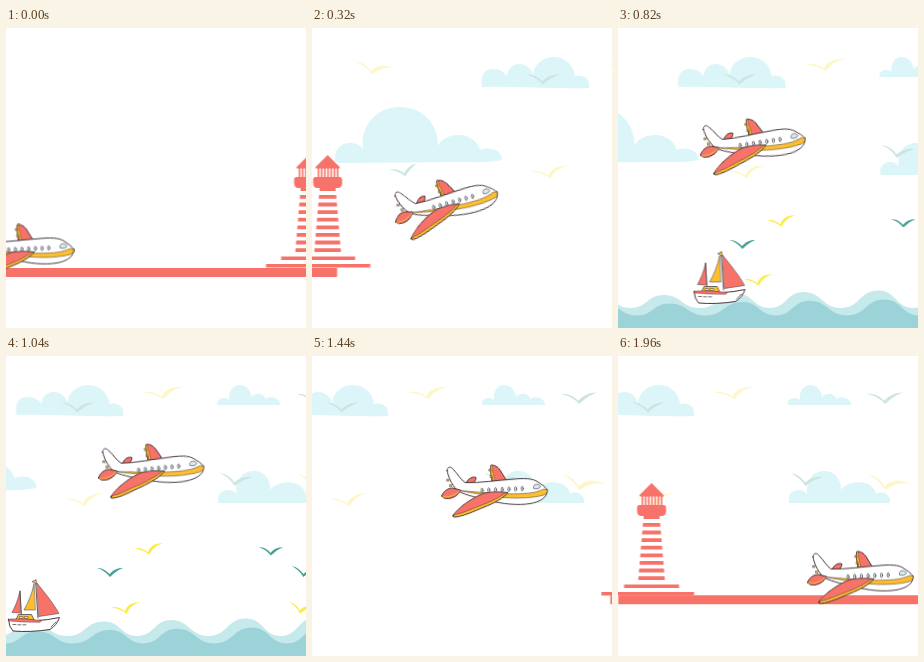
An HTML page for the animation above (1980 ms loop, 300 by 300 pixels).

```html
<!DOCTYPE html>
<html lang="en">
<head>
<meta charset="utf-8">
<title>Flight</title>
<style>
  html, body { margin: 0; width: 100%; height: 100%; overflow: hidden; background: #fff; }
  svg { display: block; width: 100vw; height: 100vh; }
  .move { animation: 1980ms linear infinite both; }

  .cloud { fill: #dbf5f8; }
  .sun { fill: #fbec45; }
  .teal { fill: #45a094; }
  .sky .sun { fill: #fdf7c8; }
  .sky .teal { fill: #cde5e1; }
  .red { fill: #f7736a; }
  .gold { fill: #fdbf2d; }
  .white { fill: #fff; }
  .glass { fill: #d3edf5; }
  .ink { stroke: #3f3036; stroke-width: .95; stroke-linejoin: round; stroke-linecap: round; }

  .sky { animation-name: sky; }
  .depart { animation-name: depart; }
  .arrive { animation-name: arrive; }
  .rise { animation-name: rise; }
  .sea { animation-name: sea; }
  .boat { animation-name: boat; }
  .planeX { animation-name: planeX; }
  .planeY { animation-name: planeY; }

  @keyframes sky {
    0% { transform: translateX(290px); animation-timing-function: cubic-bezier(.25, .6, .6, 1); }
    16.16%, 17.17% { transform: translateX(0); }
    61.77%, 100% { transform: translateX(-201px); }
  }
  @keyframes depart {
    0% { transform: translateX(303.5px); }
    16.162% { transform: translateX(16.5px); }
    21.5%, 100% { transform: translateX(-78px); }
  }
  @keyframes arrive {
    0%, 70% { transform: translateX(375px); }
    72.727% { transform: translateX(332.5px); animation-timing-function: cubic-bezier(.3, .4, .65, 1); }
    98.99%, 100% { transform: translateX(33.5px); }
  }
  @keyframes rise {
    0%, 16.5% { transform: translateY(125px); animation-timing-function: cubic-bezier(.2, .5, .5, 1); }
    24.7%, 61.5% { transform: none; animation-timing-function: cubic-bezier(.5, 0, .8, .5); }
    71.5%, 100% { transform: translateY(125px); }
  }
  @keyframes sea {
    0%, 17.17% { transform: translateX(15px); }
    61.77%, 100% { transform: translateX(-67px); }
  }
  @keyframes boat {
    0%, 17.17% { transform: translateX(53.5px); }
    61.77%, 100% { transform: translateX(-242px); }
  }
  @keyframes planeX {
    0% { transform: translateX(18px); animation-timing-function: cubic-bezier(.33, .5, .67, 1); }
    16.162% { transform: translateX(135px); animation-timing-function: ease-in-out; }
    25.253% { transform: translateX(127.5px); }
    41.414% { transform: translateX(137px); }
    52.525% { transform: translateX(148px); animation-timing-function: cubic-bezier(.4, .25, .67, .6); }
    72.727% { transform: translateX(186px); }
    98.99%, 100% { transform: translateX(246px); }
  }
  @keyframes planeY {
    0% { transform: translateY(211.5px); animation-timing-function: cubic-bezier(.33, 0, .67, .33); }
    16.162% { transform: translateY(166px) rotate(-13.2deg); animation-timing-function: cubic-bezier(.33, .4, .67, .85); }
    25.253% { transform: translateY(117px) rotate(-8.8deg); animation-timing-function: cubic-bezier(.3, .5, .67, .9); }
    41.414% { transform: translateY(105.5px) rotate(-6deg); }
    52.525% { transform: translateY(103px) rotate(-3deg); animation-timing-function: cubic-bezier(.4, .1, .7, .5); }
    72.727% { transform: translateY(124px); animation-timing-function: cubic-bezier(.35, .22, .65, .85); }
    98.99%, 100% { transform: translateY(210.5px); }
  }
</style>
</head>
<body>
<svg viewBox="0 0 300 300">
  <defs>
    <path id="bird" d="M-13-4C-8-4.5-3-1-.5 2.2C3-2 8-4.5 13-4C9-2.5 5 0 0 5C-4 0-8-2.5-13-4Z"/>
    <path id="gull" d="M-14.500-.8C-9-2-4 .5-1 3.500C0-2 6-6.500 14.500-5.800C8-4.500 4-1 .3 5.800C-4 2-9 .2-14.500-.8Z"/>
    <clipPath id="taper"><path d="M-8 160H8L13.5 226H-13.5Z"/></clipPath>
    <g id="lighthouse" class="red">
      <path d="M0 127L12 139V140.5H-12V139Z"/>
      <path d="M-10 145H11" fill="none" stroke="#f7736a" stroke-width="10" stroke-dasharray="1.6 1.6"/>
      <path d="M-12 149H12Q14.5 149 14.5 151.5V155Q14.5 160 10 160H8V163H-8V160H-10Q-14.5 160-14.5 155V151.5Q-14.5 149-12 149Z"/>
      <path d="M0 167V226" stroke="#f7736a" stroke-width="30" stroke-dasharray="3.8" clip-path="url(#taper)"/>
      <path d="M-27.5 228.5h55v3.5h-55ZM-42.5 236h85v3.6h-85Z"/>
    </g>
  </defs>

  <g class="move sky">
    <g class="cloud">
      <path d="M170 59C168 48 172 41 181 41C188 41 192 44 195 48C196 40 201 36 207 36C214 36 219 40 221 47C222 36 231 29 242 29C254 29 262 38 263 48C270 46 277 50 277 56V60C240 61 205 58 170 59Z"/>
      <path d="M23 131C23 121 29 115 38 115C43 115 48 117 51 121C48 98 64 79 88 79C110 79 126 95 126 118C129 111 137 107 147 107C158 107 166 114 168 122C178 118 190 122 190 132C175 135 160 134 150 134L30 135C24 135 22 133 23 131Z"/>
      <path d="M371 49C370 44 374 42 378 42C380 42 382 43 383 44C382 36 386 29 393 29C400 29 404 34 405 41C409 36 418 37 419 43C424 39 434 42 434 49Z"/>
      <path d="M372 147C370 138 376 134 382 134C386 134 388 136 390 138C389 124 396 115 407 115C417 115 424 122 424 134C430 124 456 122 459 138C466 134 474 139 473 147Z"/>
    </g>
    <g class="sun">
      <use href="#gull" transform="translate(62 40) rotate(17) scale(1.45 1.1)"/>
      <use href="#gull" transform="translate(238 144) scale(1.28 1.1)"/>
      <use href="#gull" transform="translate(317 37) scale(1.4 1.05)"/>
      <use href="#gull" transform="translate(471 127) rotate(22) scale(1.5 1.3)"/>
    </g>
    <g class="teal">
      <use href="#bird" transform="translate(231 51) scale(1.28 1.1)"/>
      <use href="#bird" transform="translate(92 143) rotate(-13) scale(1.08)"/>
      <use href="#bird" transform="translate(468 42) rotate(-2) scale(1.4 1.2)"/>
      <use href="#bird" transform="translate(389 124) rotate(7) scale(1.25 1.2)"/>
    </g>
  </g>

  <g class="move depart">
    <path class="red" d="M-400 240H9.5V249H-400Z"/>
    <use href="#lighthouse"/>
  </g>
  <g class="move arrive">
    <path class="red" d="M-33.4 239.3H400V248.3H-33.4Z"/>
    <use href="#lighthouse"/>
  </g>

  <g class="move rise">
    <g class="move sea">
      <g class="sun">
        <use href="#gull" transform="translate(15 203) rotate(16)"/>
        <use href="#gull" transform="translate(193 193)"/>
        <use href="#gull" transform="translate(170 252)"/>
        <use href="#gull" transform="translate(346 252) rotate(22)"/>
      </g>
      <g class="teal">
        <use href="#bird" transform="translate(4 239) rotate(-12)"/>
        <use href="#bird" transform="translate(154 216)"/>
        <use href="#bird" transform="translate(315 195) scale(.9)"/>
        <use href="#bird" transform="translate(348 216) rotate(8)"/>
      </g>
      <path id="backWave" fill="#c6e9ec"/>
      <path id="frontWave" fill="#9bd3d8"/>
    </g>
    <g class="move boat ink">
      <path class="red" d="M195 235.500C193 244 190 251 187 256.500L195.500 257Z" stroke-width=".5"/>
      <path class="gold" d="M209 228C207 238 203 247 199 254H210Z" stroke-width=".5"/>
      <path class="red" d="M212 227C220 237 229 248 234 257.500L214 260.500Z" stroke-width=".5"/>
      <path d="M210.500 224L213 262M195 235L196.500 260" fill="none" stroke-width=".8"/>
      <path class="gold" d="M211 224L207 225.500L211 228Z" stroke-width=".5"/>
      <path class="gold" d="M191 263.500L193.500 258.500H206.500L209 263.500Z" stroke-width=".7"/>
      <path class="glass" d="M195 260.500h3v2h-3ZM200 260.500h3v2h-3Z" stroke-width=".5"/>
      <path class="white" d="M183.500 263.500Q210 267 234.500 261.500Q232 269 225 273.500Q205 276.500 188 275Q184 271 183.500 263.500Z"/>
      <path class="red" d="M184 263Q200 262 217 264.500L215 266.300Q199 266.500 184 265Z" stroke-width=".4"/>
      <path d="M188 268.500h3M193 268.800h3M198 268.800h3M226 271L231 266" fill="none" stroke-width=".7"/>
    </g>
  </g>

  <g class="move planeX">
    <g class="move planeY ink">
      <path class="red" d="M-32 3C-30-2-25-4-22-2.500C-22 0-24 3-27 4Z"/>
      <path class="red" d="M-6 3C-6-3-8.500-9-7.500-14.500C-4-16 0-13 2-10L10 3Z"/>
      <path class="gold" d="M-7-15C-9-9-6-4-5 1L-3 1C-4-5-6-9-6-14.800Z" stroke-width=".4"/>
      <path class="gold" d="M-7.700-11h-1.500v2h2ZM-6.500-4.500h-1.500v2h2ZM-50-1h-1.300v2h2ZM-47 4.500h-1.500v2h2Z" stroke-width=".5"/>
      <path class="white" d="M-51-9.500C-51-13-48-14-45.500-11.500C-40-6-38-1-33 2.500C-18 3 0 0 14-.8C25-2 35-2 40 2C46 6 50 9 49 12C48 18 41 22 32 23.500C20 25.500 4 24-10 20C-24 17-36 14-41 10C-47 4-50-4-51-9.500Z"/>
      <path class="gold" d="M49 9.500C50 12 48 14 45 15.200C31 18.800 10 18.800-6 15.800C-18 14-30 12.500-38 10.500C-20 12-5 13.500 9 13.700C25 14 36 13 42 10.500Q46 8 49 9.500Z" stroke-width=".5"/>
      <path class="glass" d="M35.500 6C37 3.500 40 3.500 42.500 6.300C41.500 8.800 38.500 9.200 36 8.500Z" stroke-width=".6"/>
      <g id="windows" class="glass" stroke-width=".6"></g>
      <path class="gold" d="M-37 27C-35.500 24-32 23.500-31 25L-33 29Z" stroke-width=".6"/>
      <path class="red" d="M-56.500 16C-55 11-50 8-45.500 8L-37.500 10C-39.500 15-45 18-49.500 18.500Q-55 19-56.500 16Z"/>
      <path d="M-55.500 17Q-46 17.800-38.500 11" fill="none" stroke="#fdbf2d"/>
      <path class="gold" d="M-45 35.500C-41 29-26 17-13 13C-5 11.500 5 12 10 12.500C4 19-4 23-14 27C-24 31-34 36-43 37Q-46 37-45 35.500Z"/>
      <path class="red" d="M-45 35C-41 29-26 17-13 13C-5 11.500 4 12 8 12.500C0 18-6 21-15 24.500C-25 28-34 33-45 35Z" stroke-width=".5"/>
    </g>
  </g>
</svg>
<script>
  const peaks = [-60, 10, 75, 148, 215, 290, 360, 430];

  // Smooth swell through crests, with a trough halfway between each pair.
  function swell(id, shift, trough, crest) {
    let d = "", px, py;
    const to = (x, y) => {
      const m = (px + x) / 2;
      d += d ? `C${m} ${py} ${m} ${y} ${x} ${y}` : `M${x} ${y}`;
      px = x;
      py = y;
    };
    peaks.forEach((x, i) => {
      if (i) to((peaks[i - 1] + x) / 2 + shift, trough);
      to(x + shift, crest(i));
    });
    document.getElementById(id).setAttribute("d", d + "V440H-60Z");
  }
  swell("backWave", 0, 280, i => 270 - 1.5 * i);
  swell("frontWave", 6, 287.5, i => 278 - 1.3 * i);

  document.getElementById("windows").innerHTML = Array.from({ length: 7 }, (_, i) =>
    `<ellipse cx="${-16 + i * 6.7}" cy="${10.3 - i * .3}" rx="1.1" ry="2.3"/>`).join("");
</script>
</body>
</html>
```
